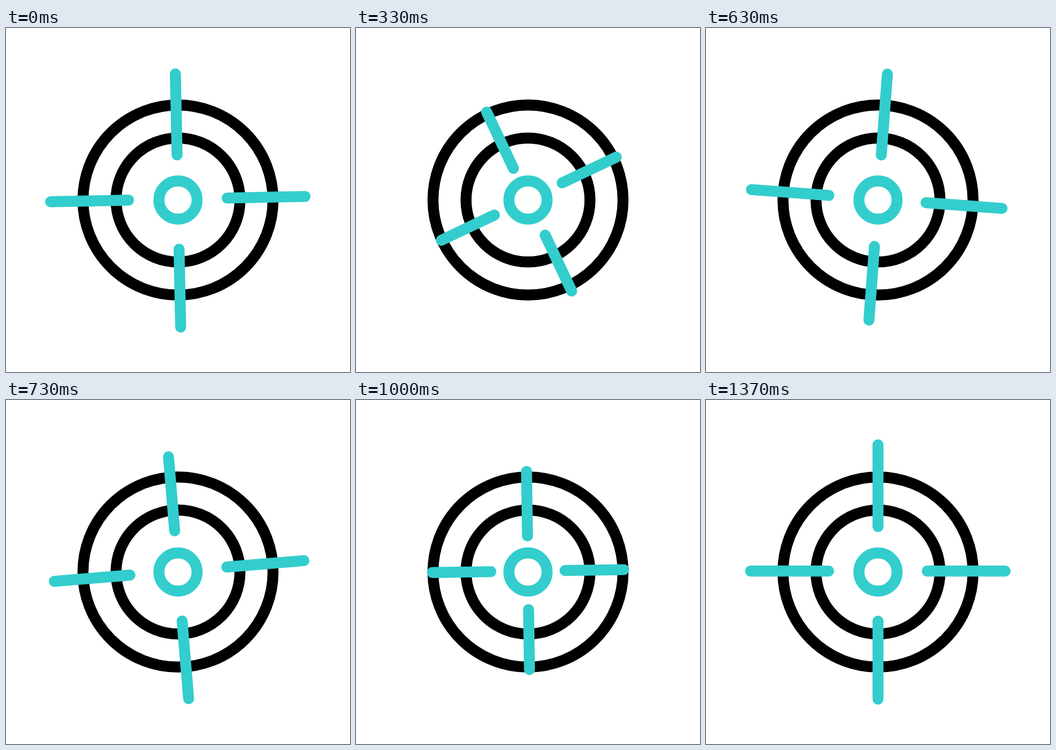
These frames come from a looping animation (640 by 640 pixels, 1670 ms). An HTML page:

```html
<!DOCTYPE html>
<html lang="en">
<head>
<meta charset="utf-8">
<title>Crosshair</title>
<style>
  html, body { margin: 0; width: 100%; height: 100%; overflow: hidden; background: #fff; }
  svg { display: block; width: 100vw; height: 100vh; }
</style>
</head>
<body>
<svg viewBox="0 0 640 640" fill="none" stroke-width="20.4" stroke-linecap="round">
  <g stroke="#000">
    <circle cx="320" cy="320" r="176.8"/>
    <circle cx="320" cy="320" r="115.3"/>
  </g>
  <g stroke="#33cdcd">
    <circle cx="320" cy="320" r="35.5"/>
    <g id="cross"></g>
  </g>
</svg>
<script>
const LOOP = 1670, STEP = 100 / 3;
const CX = 320, CY = 318.3;

// Keys are [step, value], eased in and out between neighbours.
const SPIN = [[0, 0], [9, -35], [16.05, 14], [24, -5.6], [33.3, 0]];
const PULSE = [[0, 1], [9.6, .75], [9.75, .75], [18.6, 1], [19.1, 1], [28.6, .75], [28.7, .75], [37.8, 1]];

// Unit direction, inner and outer reach, delay in steps.
const BARS = [
  { dx: 0, dy: -1, near: 82.8, far: 234.8, delay: 0 },
  { dx: -1, dy: 0, near: 92, far: 237, delay: 2 },
  { dx: 1, dy: 0, near: 91.5, far: 236.5, delay: 3 },
  { dx: 0, dy: 1, near: 93.2, far: 238.2, delay: 4 }
];

const cross = document.getElementById('cross');
for (const bar of BARS) {
  bar.line = document.createElementNS('http://www.w3.org/2000/svg', 'line');
  cross.appendChild(bar.line);
}

const smooth = x => x * x * (3 - 2 * x);

function track(keys, t) {
  if (t <= keys[0][0]) return keys[0][1];
  for (let i = 1; i < keys.length; i++) {
    const [t0, v0] = keys[i - 1], [t1, v1] = keys[i];
    if (t < t1) return v0 + (v1 - v0) * smooth((t - t0) / (t1 - t0));
  }
  return keys[keys.length - 1][1];
}

function draw(ms) {
  // Hold each pose for one step, on a 10 ms clock.
  const clock = Math.floor((ms % LOOP) / 10) * 10;
  const step = Math.floor((clock + 3.5) / STEP) + 1;
  cross.setAttribute('transform', `rotate(${track(SPIN, step)} ${CX} ${CY})`);
  for (const { line, dx, dy, near, far, delay } of BARS) {
    const k = track(PULSE, step - delay);
    line.setAttribute('x1', CX + dx * near * k);
    line.setAttribute('y1', CY + dy * near * k);
    line.setAttribute('x2', CX + dx * far * k);
    line.setAttribute('y2', CY + dy * far * k);
  }
}

const start = performance.now();
function tick() {
  draw(performance.now() - start);
  requestAnimationFrame(tick);
}
tick();
</script>
</body>
</html>
```
